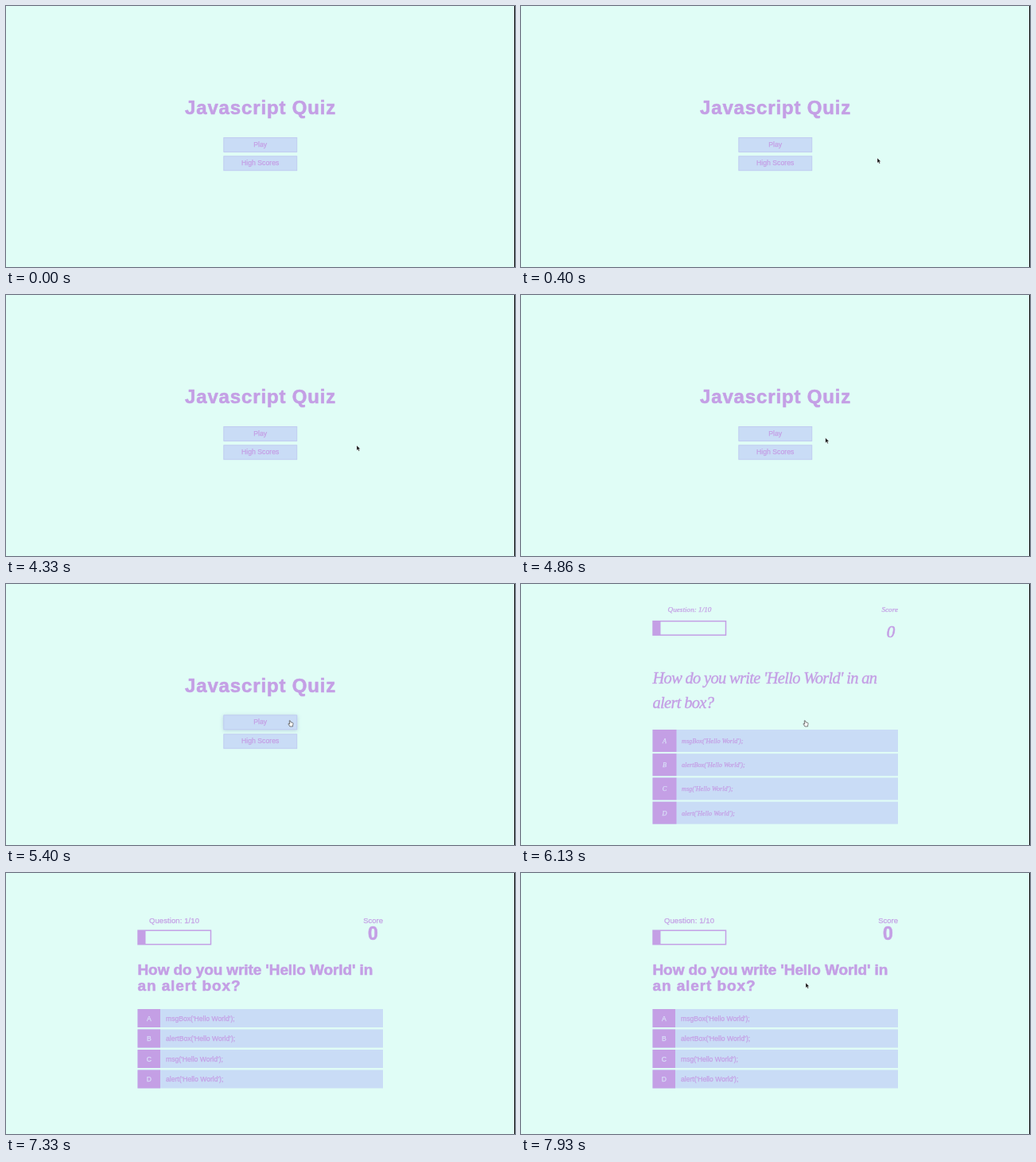
Animation, 640 px wide and 328 px high, one loop 8000 ms. Source, as an HTML page:

```html
<!DOCTYPE html>
<html lang="en">
<head>
<meta charset="utf-8">
<title>Javascript Quiz</title>
<style>
  html, body { margin: 0; width: 100%; height: 100%; overflow: hidden; background: #e0fdf6; }
  svg { display: block; width: 640px; height: 328px; }
  text { font-family: "Liberation Sans", Arial, sans-serif; fill: #c49fe5; stroke: #c49fe5; stroke-linejoin: round; }
  .script text { font-family: "Liberation Serif", "Times New Roman", serif; font-style: italic; }
  .bold { font-weight: bold; }
  .pale { fill: #d8e0f8; stroke: #d8e0f8; }
</style>
</head>
<body>
<svg id="stage" viewBox="0 0 640 328"></svg>
<script>
const LOOP = 8000, PURPLE = '#c49fe5', BLUE = '#c9dcf6';
const stage = document.getElementById('stage');

const text = (s, x, y, size, { anchor = 'start', weight = 0.25, gap = 0, cls = '' } = {}) =>
  `<text x="${x}" y="${y}" font-size="${size}" text-anchor="${anchor}" stroke-width="${weight}" letter-spacing="${gap}" class="${cls}">${s}</text>`;
const bold = (s, x, y, size, options) => text(s, x, y, size, { weight: 0.6, cls: 'bold', ...options });
const rect = (x, y, w, h, fill, extra = '') =>
  `<rect x="${x}" y="${y}" width="${w}" height="${h}" fill="${fill}" ${extra}/>`;

const button = (id, label, y) => `<g id="${id}">
  ${rect(273.8, y, 92, 18, BLUE, 'stroke="#bdc5f0" stroke-width=".8"')}
  ${text(label, 319.7, y + 11.6, 8.7, { anchor: 'middle' })}</g>`;

const bar = y => rect(166, y, 91.5, 17.5, 'none', `stroke="${PURPLE}" stroke-width="1.5"`) +
  rect(166, y, 9.5, 17.5, PURPLE);

const calls = ['msgBox', 'alertBox', 'msg', 'alert'];
const answers = (top, step, height, split, size, indent) => calls.map((call, i) => {
  const y = top + i * step, base = y + height / 2 + 3;
  return `<g class="answer">${rect(165.5, y, 308.5, height, BLUE)}
    ${rect(165.5, y, split - 165.5, height, PURPLE)}
    ${text('ABCD'[i], (165.5 + split) / 2, base, size, { anchor: 'middle', cls: 'pale' })}
    ${text(`${call}('Hello World');`, indent, base, size)}</g>`;
}).join('');

stage.innerHTML = `
  ${rect(0, 0, 640, 328, '#e0fdf6')}
  <g id="home">
    ${bold('Javascript Quiz', 225, 136, 24, { gap: 0.85 })}
    ${button('play', 'Play', 165.5)}
    ${button('scores', 'High Scores', 188.8)}
  </g>
  <g id="unstyled" class="script">
    ${text('Question: 1/10', 212, 35, 9.2, { anchor: 'middle' })}
    ${text('Score', 474, 35, 9.2, { anchor: 'end' })}
    ${text('0', 465, 67, 21, { anchor: 'middle', weight: 0.6 })}
    ${bar(46.7)}
    ${text("How do you write 'Hello World' in an", 165.5, 124.5, 20.5, { weight: 0.4, gap: -0.7 })}
    ${text('alert box?', 165.5, 155.5, 20.5, { weight: 0.4, gap: -0.7 })}
    ${answers(183, 30.2, 28, 195.5, 8.2, 202)}
  </g>
  <g id="quiz">
    ${text('Question: 1/10', 211.5, 62.5, 9.5, { anchor: 'middle', gap: 0.1 })}
    ${text('Score', 474, 62.5, 9.5, { anchor: 'end' })}
    ${bold('0', 461.5, 83.6, 23, { anchor: 'middle' })}
    ${bar(72.2)}
    ${bold("How do you write 'Hello World' in", 165.5, 128, 19, { gap: -0.1 })}
    ${bold('an alert box?', 165.5, 147.5, 19, { gap: 0.9 })}
    ${answers(171, 25.5, 23, 194, 8.6, 201)}
  </g>
  ${rect(639, 0, 1, 328, '#0b0b0b')}
  <path id="arrow" d="M0 0V6.3L1.5 5L2.5 7.3L3.6 6.8L2.6 4.6H4.5Z" fill="#111" stroke="#fff" stroke-width=".4"/>
  <path id="hand" d="M-1.8 -4.2Q-1.1 -5 -.5 -4.1L0 -2.2L2.2 -1.8Q3.2 -1.5 3.1 -.5L2.6 1.7V3H-1.1L-3 .1Q-3.2 -.9 -2.2 -.7L-1.2 .2Z"
    fill="#fff" stroke="#444" stroke-width=".7" stroke-linejoin="round"/>`;

const byId = id => document.getElementById(id);
const [home, unstyled, quiz, play, arrow, hand] =
  ['home', 'unstyled', 'quiz', 'play', 'arrow', 'hand'].map(byId);
const firstAnswer = quiz.querySelector('.answer');

const show = (el, on) => el.setAttribute('visibility', on ? 'visible' : 'hidden');
const clamp = v => Math.min(1, Math.max(0, v));
const smooth = v => v * v * (3 - 2 * v);
const lerp = (a, b, k) => a + (b - a) * k;

// Pointer strokes; the pointer hides itself when left alone.
const strokes = [
  { start: 200, end: 400, hide: 2330, from: [504, 168], to: [448, 191] },
  { start: 4330, end: 5130, hide: 5200, from: [441, 189], to: [362, 176] },
  { start: 5200, end: 5400, hide: 7330, from: [361, 176], to: [358, 176] },
  { start: 7600, end: 7930, hide: LOOP, from: [358, 175], to: [358, 138] }
];

function pointerAt(t) {
  const s = strokes.find(s => t >= s.start && t < s.hide);
  if (!s) return null;
  const k = smooth(clamp((t - s.start) / (s.end - s.start)));
  return s.from.map((v, i) => lerp(v, s.to[i], k));
}

function hover(el, amount) {
  el.setAttribute('transform', `translate(0 ${-0.6 * amount})`);
  el.style.filter = amount ? `drop-shadow(0 1px 2.5px rgba(120,140,190,${0.35 * amount}))` : 'none';
}

function draw(now) {
  const t = now % LOOP;
  show(home, t < 6130);
  show(unstyled, t >= 6130 && t < 6200);
  show(quiz, t >= 6200);

  const p = pointerAt(t);
  const pointing = p && (t < 6130 ? p[0] < 366 : t < 7330 || p[1] > 171);
  show(arrow, p && !pointing);
  show(hand, pointing);
  if (p) (pointing ? hand : arrow).setAttribute('transform', `translate(${p})`);

  hover(play, clamp((t - 4950) / 150));
  hover(firstAnswer, t < 7600 ? 0 : clamp((t - 7590) / 60) * clamp((7830 - t) / 120));
  requestAnimationFrame(draw);
}
requestAnimationFrame(draw);
</script>
</body>
</html>
```
